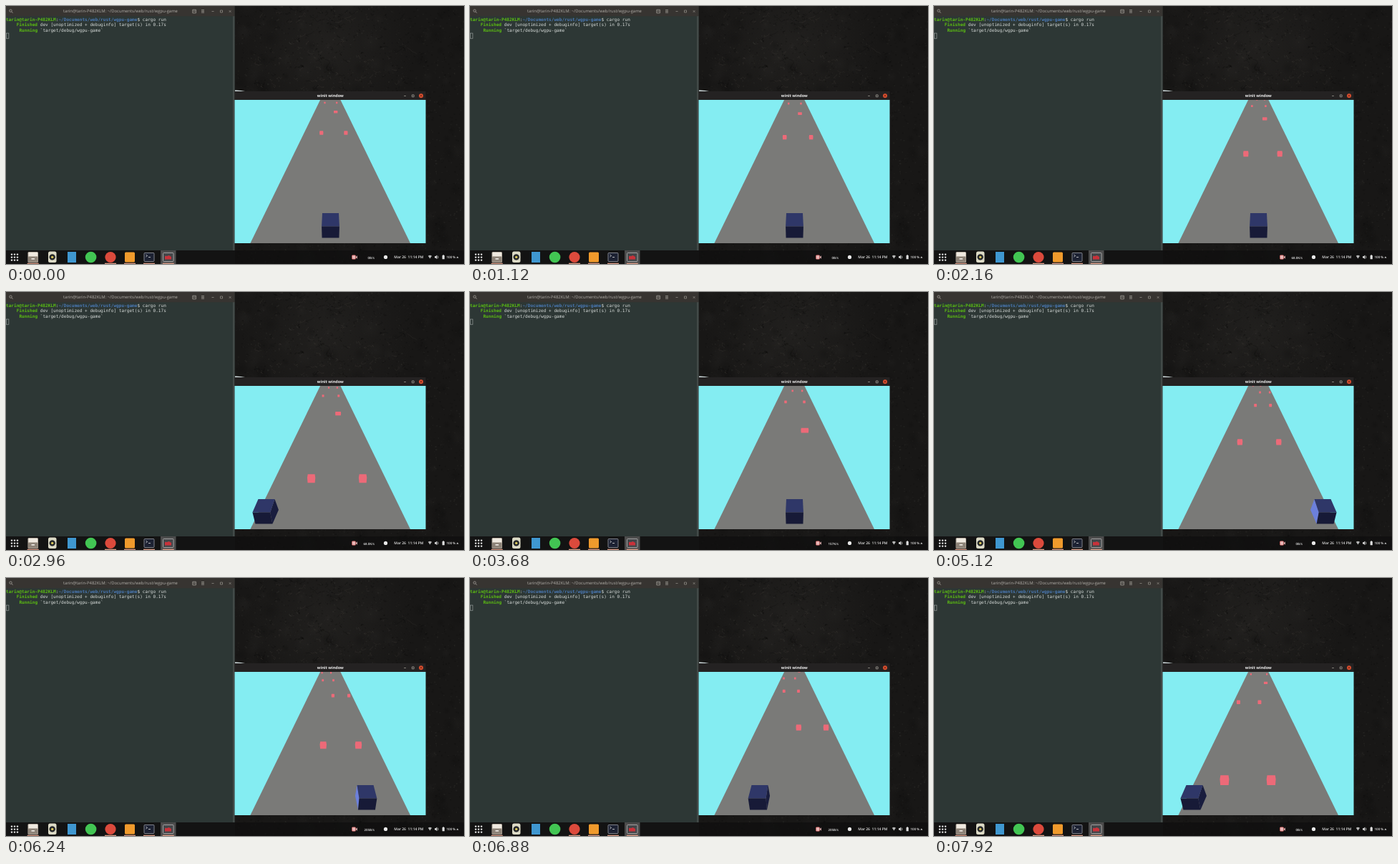
Recreate the animation shown at these times as an HTML page with a canvas. Size 640 by 360 pixels, loop 8000 ms.

```html
<!DOCTYPE html>
<html lang="en">
<head>
<meta charset="utf-8">
<title>Desktop with a small road game</title>
<style>
  html, body { margin: 0; width: 100%; height: 100%; overflow: hidden; background: #161616; }
  canvas, svg { position: absolute; left: 0; top: 0; width: 640px; height: 360px; display: block; }
  text { font-family: "Open Sans", "Noto Sans", sans-serif; text-rendering: geometricPrecision; white-space: pre; }
  .mono text { font: 6.1px "DejaVu Sans Mono", monospace; fill: #d6dbd9; }
  .mono .g { fill: #5cbd12; font-weight: bold; }
  .mono .b { fill: #4a78b4; font-weight: bold; }
  .tray text { font-size: 5px; font-weight: 600; fill: #e6e6e6; }
  .line { fill: none; stroke: #dcdcdc; stroke-width: .8; }
  .dim { stroke: #a5a19b; }
</style>
</head>
<body>
<canvas id="wall" width="640" height="360"></canvas>
<svg viewBox="0 0 640 360">
  <defs>
    <clipPath id="view"><rect x="319.5" y="131" width="267" height="200"/></clipPath>
  </defs>

  <!-- dock -->
  <rect y="341" width="640" height="19" fill="#0c0c0c" opacity=".6"/>
  <rect y="341" width="320" height="19" fill="#141414" opacity=".7"/>
  <rect x="216" y="341" width="21.5" height="19" fill="#4c4c4c"/>
  <g id="dots" fill="#f2f2f2"></g>
  <g>
    <rect x="30.5" y="343" width="14.5" height="15" rx="1.5" fill="#b9b0a4"/>
    <rect x="31.5" y="344" width="12.5" height="5" fill="#efe9e0"/>
    <rect x="31" y="350" width="13.5" height="7.5" rx="1" fill="#8d8378"/>
    <rect x="35.5" y="352" width="4.5" height="1.6" fill="#f0ece6"/>
    <rect x="59" y="342.5" width="11.5" height="15.5" rx="2.5" fill="#dcdac6"/>
    <circle cx="64.7" cy="350.4" r="4.2" fill="#25272a"/>
    <circle cx="64.7" cy="350.4" r="1.7" fill="#d9c65a"/>
    <rect x="86" y="343" width="12" height="15" fill="#3f97d0"/>
    <circle cx="118.6" cy="350.5" r="7.8" fill="#42c553"/>
    <circle cx="146" cy="350.5" r="7.6" fill="#dc4a3c"/>
    <rect x="166" y="343.5" width="14" height="14" rx="1.5" fill="#f09a2c"/>
    <rect x="193" y="344.5" width="14" height="12" rx="1" fill="#1d2233" stroke="#9a9da6" stroke-width=".8"/>
    <path d="M195.5 347l2 1.5-2 1.5M199 350.5h3" class="line"/>
    <rect x="219.5" y="344.5" width="14.5" height="12" rx="1" fill="#45474a" stroke="#b9b9b9" stroke-width=".8"/>
    <path d="M222 353.5v-4.5h3.5l2-1 3.5 2v3.5z" fill="#c8323a"/>
    <g id="marks" fill="#d99a84"></g>
  </g>

  <!-- tray -->
  <g class="tray">
    <rect x="483.5" y="347.8" width="5" height="5.4" rx=".8" fill="#e8b9b9" stroke="#d94f4f" stroke-width=".6"/>
    <path d="M488.5 350.5l2.3-2.2v4.4z" fill="#e8b9b9"/>
    <text id="net" x="514.8" y="352.5" text-anchor="end" style="font-size:4.4px"></text>
    <circle cx="530.5" cy="350.4" r="2.6" fill="#e8e8e8"/>
    <text x="542.3" y="352.3">Mar 26  11:14 PM</text>
    <path d="M589.8 348.8q2.6-2.2 5.2 0l-2.6 3.8z" fill="#b8b8b8"/>
    <path d="M599 349.3h1.4l1.8-1.7v5.6l-1.8-1.7H599z" fill="#dedede"/>
    <path d="M603.2 348.6q1.3 1.8 0 3.6" class="line"/>
    <rect x="609.6" y="348" width="3.2" height="5.2" rx=".5" fill="#dedede"/>
    <rect x="610.5" y="347.2" width="1.4" height="1" fill="#dedede"/>
    <text x="615.5" y="352.3" style="font-size:4.5px">100 %</text>
    <path d="M629.3 351.6l1.6-2 1.6 2z" fill="#dedede"/>
  </g>

  <!-- terminal -->
  <rect width="319.5" height="341" fill="#2d3735"/>
  <rect x="317" y="14" width="2.5" height="327" fill="#434a48"/>
  <rect width="319.5" height="14.2" fill="#373431"/>
  <text x="160" y="9.2" text-anchor="middle" font-size="5.9" fill="#b0ada8">tarin@tarin-P482KLM: ~/Documents/web/rust/wgpu-game</text>
  <g class="line dim">
    <circle cx="6.5" cy="6.6" r="1.7"/>
    <path d="M7.8 7.9l1.8 1.9"/>
    <path d="M260.8 5.2h4.6v4.6h-4.6zM261.5 7.2h3.2"/>
    <path d="M273 5.6h4M273 7.4h4M273 9.2h4"/>
    <path d="M287.5 7.5h3M299.5 6h3v3h-3zM311.8 6.2l2.6 2.6m0-2.6l-2.6 2.6" stroke-width=".6"/>
  </g>
  <g class="mono">
    <text x="0" y="20.6"><tspan class="g">tarin@tarin-P482KLM</tspan>:<tspan class="b">~/Documents/web/rust/wgpu-game</tspan>$ cargo run</text>
    <text x="14.7" y="28.2"><tspan class="g">Finished</tspan> dev [unoptimized + debuginfo] target(s) in 0.17s</text>
    <text x="18.4" y="35.8"><tspan class="g">Running</tspan> `target/debug/wgpu-game`</text>
    <rect x=".5" y="38" width="3.4" height="7.2" fill="none" stroke="#a3aaa8" stroke-width=".6"/>
  </g>

  <!-- game window -->
  <path d="M320 119v-1.6q8-.2 14 1.6z" fill="#d8e4e6"/>
  <rect x="319.5" y="119" width="267" height="212" fill="#242222"/>
  <text x="453.3" y="127.3" text-anchor="middle" font-size="5.5" font-weight="bold" fill="#f0f0f0">winit window</text>
  <path d="M556.2 125.5h2.6M567.3 124h2.8v2.8h-2.8z" class="line dim" stroke-width=".7"/>
  <circle cx="580" cy="125.3" r="3" fill="#dc5030"/>
  <path d="M578.8 124.1l2.4 2.4m0-2.4l-2.4 2.4" fill="none" stroke="#5a1c0c" stroke-width=".8"/>
  <g clip-path="url(#view)">
    <rect x="319" y="131" width="268" height="200" fill="#84edf2"/>
    <path d="M439.1 131h28.3L565 331H341.4z" fill="#7a7a78"/>
    <path id="blocks" fill="#ec6a78"/>
    <path id="left" fill="#6c80dc"/>
    <path id="right" fill="#191d3e"/>
    <path id="top" fill="#2f3768"/>
    <path id="front" fill="#171a37"/>
  </g>
</svg>
<script>
const $ = id => document.getElementById(id);
const LOOP = 8000, STEP = 80;
const CX = 453.5, HORIZON = 102;

// Rows of blocks, nearest first: sideways slope of each block
const rows = [
  [-.17, .285], [.133, .181], [-.243, .263], [-.078, .297], [.054, .413],
  [-.264, .098], [-.394, .02], [.202, .25], [-.33, .36]
];

// Player's sideways position: seconds, pixels from the road's middle
const moves = [
  [0, 0], [2.4, 0], [2.6, -49], [2.8, -89.5], [3.4, -89.5], [3.66, 0], [4.26, 0],
  [4.42, 49], [4.64, 89.5], [5.97, 89.5], [7.15, -89.5], [8, -89.5]
];

const speeds = [[0, "0B/s"], [2, "68.0K/s"], [3, "157K/s"], [4, "0B/s"], [6, "205B/s"], [7.1, "0B/s"]];

function along(keys, t) {
  const i = Math.max(1, keys.findIndex(k => k[0] > t));
  const [t0, a] = keys[i - 1], [t1, b] = keys[i];
  return a + (b - a) * (t - t0) / (t1 - t0);
}

const poly = pts => "M" + pts.map(p => p.map(v => v.toFixed(2)).join(" ")).join("L") + "Z";

// The road speeds up steadily from rest; depth is the inverse of height below the horizon
function blocksAt(t) {
  let d = "";
  rows.forEach((row, i) => {
    const depth = .01333 + .00848 * i - .0008 * t * t;
    if (depth < .0039) return;
    const u = 1 / depth, y = HORIZON + u;
    for (const slope of row) {
      const x = CX + slope * u;
      const at = (dx, dy) => [x + dx * u, y + dy * u];
      d += poly([at(-.031, -.038), at(.031, -.038), at(.036, -.008),
                 at(.032, .038), at(-.032, .038), at(-.036, -.008)]);
    }
  });
  return d;
}

function drawCube(d) {
  const edge = (scale, y) => [-11.5, 11.5].map(w => [CX + (d + w) * scale, y]);
  const tb = edge(1, 289), tf = edge(1.08, 307.5), bf = edge(1.04, 323.5), bb = edge(.93, 304);
  const side = i => poly([tb[i], tf[i], bf[i], bb[i]]);
  $("left").setAttribute("d", d > 12 ? side(0) : "");
  $("right").setAttribute("d", d < -12 ? side(1) : "");
  $("top").setAttribute("d", poly([tb[0], tb[1], tf[1], tf[0]]));
  $("front").setAttribute("d", poly([tf[0], tf[1], bf[1], bf[0]]));
}

// Worn dark stone: soft stains, fine grain and short cracks
function paintWall() {
  const c = $("wall").getContext("2d");
  let seed = 7;
  const rnd = () => (seed = seed * 16807 % 2147483647) / 2147483647;
  c.fillStyle = "#181716";
  c.fillRect(0, 0, 640, 360);
  const blob = (x, y, r, color) => {
    const g = c.createRadialGradient(x, y, 0, x, y, r);
    g.addColorStop(0, `rgba(${color})`);
    g.addColorStop(1, `rgba(${color.replace(/[^,]+$/, "0")})`);
    c.fillStyle = g;
    c.fillRect(x - r, y - r, 2 * r, 2 * r);
  };
  blob(450, 55, 120, "50,48,45,.35");
  for (let i = 0; i < 160; i++) {
    const color = rnd() < .5 ? "62,60,57,.1" : "0,0,0,.14";
    blob(320 + rnd() * 320, rnd() * 360, 4 + rnd() * 12, color);
  }
  for (let i = 0; i < 2600; i++) {
    c.fillStyle = rnd() < .5 ? "rgba(95,92,86,.13)" : "rgba(0,0,0,.18)";
    c.fillRect(320 + rnd() * 320, rnd() * 360, .5 + rnd() * 1.8, .5 + rnd() * 1.8);
  }
  c.lineWidth = .6;
  for (let i = 0; i < 130; i++) {
    let x = 330 + (rnd() + rnd()) * 130, y = rnd() * 118;
    c.strokeStyle = rnd() < .5 ? "rgba(110,106,99,.2)" : "rgba(0,0,0,.3)";
    c.beginPath();
    c.moveTo(x, y);
    for (let j = 0; j < 4; j++) c.lineTo(x += rnd() * 8 - 4, y += rnd() * 6 - 3);
    c.stroke();
  }
}

function addShapes(id, name, list) {
  for (const attrs of list) {
    const el = document.createElementNS("http://www.w3.org/2000/svg", name);
    for (const key in attrs) el.setAttribute(key, attrs[key]);
    $(id).append(el);
  }
}

function frame() {
  const t = Math.floor(performance.now() % LOOP / STEP) * STEP / 1000;
  $("blocks").setAttribute("d", blocksAt(t));
  drawCube(along(moves, t));
  $("net").textContent = speeds.filter(s => s[0] <= t).pop()[1];
  requestAnimationFrame(frame);
}

paintWall();
addShapes("dots", "circle", [...Array(9).keys()].map(i =>
  ({ cx: 8 + i % 3 * 4, cy: 346.6 + Math.floor(i / 3) * 4, r: 1.2 })));
addShapes("marks", "rect", [37.7, 146, 173, 200, 226.8].map(x =>
  ({ x: x - 8, y: 358.7, width: 16, height: 1.3 })));
frame();
</script>
</body>
</html>
```
